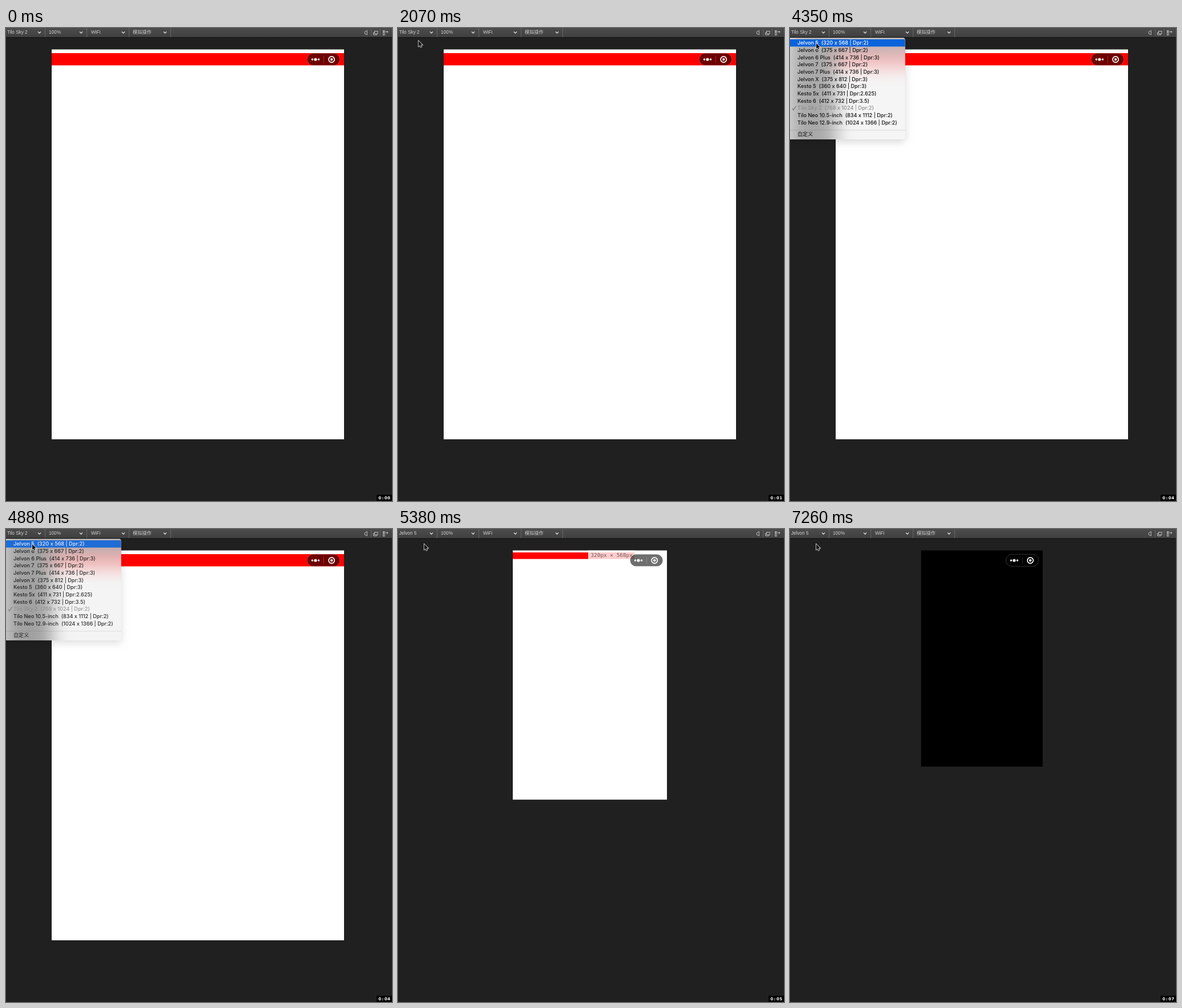
Recreate the animation shown at these times as an HTML page with a canvas. Size 676x828 px, loop 8000 ms.

```html
<!DOCTYPE html>
<html lang="zh">
<head>
<meta charset="utf-8">
<title>Device simulator</title>
<style>
html, body { margin: 0; width: 100%; height: 100%; overflow: hidden; background: #202020; }
canvas { display: block; }
</style>
</head>
<body>
<canvas id="stage" width="676" height="828"></canvas>
<script>
const stage = document.getElementById('stage');
const ctx = stage.getContext('2d');
const back = document.createElement('canvas');
back.width = back.height = 300;
const backCtx = back.getContext('2d');

const LOOP = 8000, SECOND = 1037;
const MENU_OPEN = 3950, PICK = 4710, FADE = 4850, SWITCH = 5100;
const RESIZE = 5300, SETTLED = 5590, RELOAD = 6610;
const UI = '8.2px "Liberation Sans", "Noto Sans CJK SC", "Noto Sans CJK", sans-serif';
const MENU = '500 9.1px Inter, "Noto Sans CJK SC", "Noto Sans CJK", sans-serif';
const OLD_DEVICE = 'Tilo Sky 2', NEW_DEVICE = 'Jelvon 5';

const devices = [
  'Jelvon 5  (320 x 568 | Dpr:2)',
  'Jelvon 6  (375 x 667 | Dpr:2)',
  'Jelvon 6 Plus  (414 x 736 | Dpr:3)',
  'Jelvon 7  (375 x 667 | Dpr:2)',
  'Jelvon 7 Plus  (414 x 736 | Dpr:3)',
  'Jelvon X  (375 x 812 | Dpr:3)',
  'Kesto 5  (360 x 640 | Dpr:3)',
  'Kesto 5x  (411 x 731 | Dpr:2.625)',
  'Kesto 6  (412 x 732 | Dpr:3.5)',
  'Tilo Sky 2  (768 x 1024 | Dpr:2)',
  'Tilo Neo 10.5-inch  (834 x 1112 | Dpr:2)',
  'Tilo Neo 12.9-inch  (1024 x 1366 | Dpr:2)'
];

// pointer stops: time, x, y
const stops = [
  [1420, 364, 192], [1760, 364, 192], [1880, 50, 31], [2070, 36, 22],
  [2390, 46, 26], [2690, 46, 26], [3020, 22, 6], [3400, 37, 16],
  [3650, 35, 4], [4350, 46, 26]
];

function rect(x, y, w, h, color) {
  ctx.fillStyle = color;
  ctx.fillRect(x, y, w, h);
}
function text(s, x, y, font, color, align = 'left') {
  ctx.font = font;
  ctx.fillStyle = color;
  ctx.textAlign = align;
  ctx.fillText(s, x, y);
}
function line(points, color, width, close) {
  ctx.beginPath();
  points.forEach(([x, y]) => ctx.lineTo(x, y));
  if (close) ctx.closePath();
  ctx.strokeStyle = color;
  ctx.lineWidth = width;
  ctx.stroke();
}
function dot(x, y, r) {
  ctx.beginPath();
  ctx.arc(x, y, r, 0, 7);
  ctx.fill();
}

function toolbar(device) {
  const g = ctx.createLinearGradient(0, 0, 0, 16);
  g.addColorStop(0, '#4c4c4c');
  g.addColorStop(1, '#404040');
  rect(0, 0, 676, 16, g);
  rect(0, 16, 676, 1, '#111');
  [device, '100%', 'WiFi', '模拟操作'].forEach((s, i) => {
    const x = Math.round(i * 73.4), c = x + 58.5;
    text(s, x + 2, 10.3, UI, '#d0d0d0');
    line([[c - 2.5, 6.5], [c, 9], [c + 2.5, 6.5]], '#ddd', 1.3);
    rect(x + 68, 0, 1, 16, '#666');
  });

  for (const x of [639, 655]) rect(x, 2, 1, 12, '#666');
  line([[628.3, 6.5], [632.3, 4.5], [632.3, 12], [628.3, 10]], '#ccc', 0.9, true);
  ctx.strokeRect(645.5, 5.5, 5.5, 4.5);
  line([[645, 7.8], [643.5, 7.8], [643.5, 12], [649.5, 12], [649.5, 10.5]], '#ccc', 0.9);
  ctx.strokeRect(660.5, 4.5, 2.5, 2);
  ctx.strokeRect(660.5, 8, 2.5, 4.5);
  line([[664.5, 6.7], [669, 6.7]], '#ccc', 1);
  line([[667, 4.8], [669, 6.7], [667, 8.6]], '#ccc', 0.9);
}

function capsule(right) {
  ctx.save();
  ctx.translate(right - 36, 55);
  ctx.beginPath();
  ctx.roundRect(-28.6, -10.7, 57.3, 21, 10.5);
  ctx.fillStyle = 'rgba(0,0,0,.57)';
  ctx.fill();
  ctx.strokeStyle = 'rgba(255,255,255,.25)';
  ctx.lineWidth = 0.8;
  ctx.stroke();
  rect(0, -6, 0.8, 12, 'rgba(255,255,255,.25)');
  ctx.fillStyle = '#fff';
  for (const i of [-1, 0, 1]) dot(-14 + i * 5.5, 0, i ? 1.7 : 2.6);
  dot(14.2, 0, 2.2);
  ctx.beginPath();
  ctx.arc(14.2, 0, 5.1, 0, 7);
  ctx.strokeStyle = '#fff';
  ctx.lineWidth = 1.7;
  ctx.stroke();
  ctx.restore();
}

function phone(t) {
  // the window shrinks around its centre line in two jumps
  const k = t < RESIZE + 80 ? 0 : t < SETTLED ? 0.81 : 1;
  const w = 512 - 298.7 * k, h = 682.7 - 304 * k, x = 336 - w / 2;
  const dark = t >= RELOAD;
  ctx.save();
  ctx.beginPath();
  ctx.rect(x, 37.4, w, h);
  ctx.clip();
  rect(x, 37, w, h + 1, dark ? '#000' : '#fff');
  if (t < RESIZE) rect(x, 44, w, 21.4, '#f00');
  else if (!dark) {
    rect(x, 41, 213.3, 11.5, '#f00');
    if (t < 6330) {
      rect(x + 132, 37, 82, 19, 'rgba(255,255,255,.8)');
      text('320px × 568px', x + 136.5, 49.3, '9.4px "DejaVu Sans Mono", monospace', 'rgba(0,0,0,.57)');
    }
  }
  capsule(x + w);
  ctx.restore();
}

function menu(t) {
  backCtx.drawImage(stage, 0, 0);
  ctx.save();
  ctx.globalAlpha = Math.min(1, Math.max(0, 1 - (t - FADE) / (SWITCH - FADE)));
  ctx.beginPath();
  ctx.roundRect(-5, 17, 206.5, 178, 4);
  ctx.shadowColor = 'rgba(0,0,0,.16)';
  ctx.shadowBlur = 14;
  ctx.shadowOffsetY = 4;
  ctx.fillStyle = '#ddd';
  ctx.fill();
  ctx.shadowColor = 'transparent';
  ctx.clip();
  // frosted glass
  ctx.filter = 'blur(16px)';
  ctx.drawImage(back, 0, 0);
  ctx.filter = 'none';
  rect(0, 17, 202, 178, 'rgba(240,240,240,.66)');

  const lit = t >= 4350 && (t < PICK || t >= PICK + 70);
  if (lit) rect(0, 19.8, 202, 12.7, '#0b63dc');
  devices.forEach((s, i) => {
    const color = i === 0 && lit ? '#fff' : s.startsWith(OLD_DEVICE) ? '#8c8c8c' : '#111';
    text(s, 13, 29.3 + i * 12.66, MENU, color);
  });
  line([[4, 140.5], [6, 143.5], [10.5, 136.5]], '#777', 1.3);
  rect(0, 178.3, 202, 1, 'rgba(0,0,0,.12)');
  text('自定义', 13, 189.4, MENU, '#111');
  ctx.restore();
}

function pointerAt(t) {
  const i = stops.findIndex(s => s[0] > t);
  if (i < 0) return stops[stops.length - 1].slice(1);
  const [t0, x0, y0] = stops[i - 1], [t1, x1, y1] = stops[i];
  const p = (t - t0) / (t1 - t0);
  return [x0 + (x1 - x0) * p, y0 + (y1 - y0) * p];
}

function pointer(t) {
  if (t < stops[0][0]) return;
  ctx.save();
  if (t >= 6130 && t < 6790) {
    ctx.translate(46.2, 27.7);
    for (const [color, width] of [['#e8e8e8', 2], ['#222', 0.7]]) {
      line([[0, -4.8], [0, 4.8]], color, width);
      line([[-1.6, 2.3], [1.6, 2.3]], color, width);
      for (const s of [-1, 1])
        line([[-2.7, 5.8 * s], [-0.9, 5.8 * s], [0, 4.8 * s], [0.9, 5.8 * s], [2.7, 5.8 * s]], color, width);
    }
  } else {
    const [x, y] = pointerAt(t);
    ctx.translate(x, y + 0.6);
    line([[0, 0], [0, 9.6], [2.2, 7.7], [3.6, 11], [5.2, 10.3], [3.9, 7], [6.8, 7]], '#eee', 1.5, true);
    ctx.fillStyle = '#111';
    ctx.fill();
  }
  ctx.restore();
}

function clock(t) {
  rect(649, 817, 27, 11, '#000');
  [...'0:0' + Math.floor(t / SECOND)].forEach((c, i) =>
    text(c, 654.6 + i * 5.3, 825, 'bold 7px "DejaVu Sans", sans-serif', '#fff', 'center'));
}

function draw(t) {
  rect(0, 0, 676, 828, '#202020');
  toolbar(t < SWITCH ? OLD_DEVICE : NEW_DEVICE);
  phone(t);
  if (t >= MENU_OPEN && t < SWITCH) menu(t);
  pointer(t);
  clock(t);
}

const start = performance.now();
function loop() {
  draw((performance.now() - start) % LOOP);
  requestAnimationFrame(loop);
}
loop();
</script>
</body>
</html>
```
